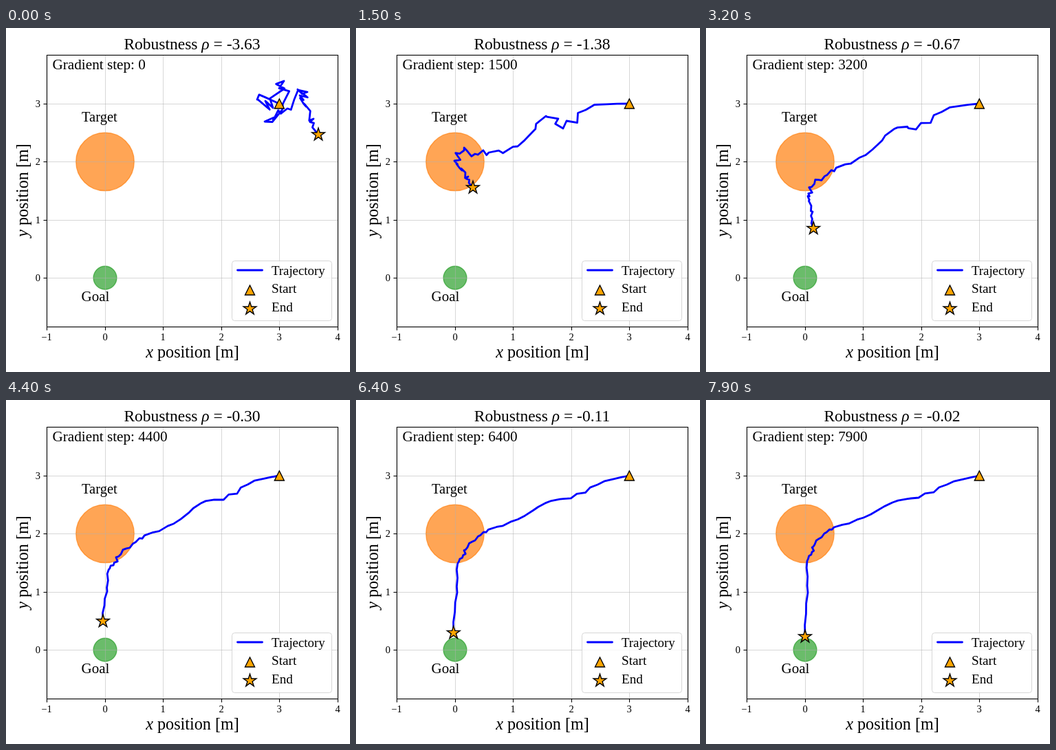
Animation of 500x500 px, one loop 8000 ms. Source, as an HTML page:

```html
<!DOCTYPE html>
<html lang="en">
<head>
<meta charset="utf-8">
<title>Trajectory optimisation</title>
<style>
html, body { margin: 0; width: 100%; height: 100%; overflow: hidden; background: #fff; }
svg { display: block; width: 100vw; height: 100vh; font-family: "Liberation Serif", serif; }
.marker { fill: #ffa500; stroke: #000; stroke-width: 1.4; }
.path { fill: none; stroke: #00f; stroke-width: 2.8; stroke-linejoin: round; stroke-linecap: round; }
.disc { fill-opacity: .7; stroke-opacity: .7; stroke-width: 1.4; }
.grid { stroke: #b0b0b0; stroke-opacity: .5; stroke-width: 1; }
.axis { fill: none; stroke: #000; stroke-width: 1.1; }
.tick { font-size: 14.5px; }
.label { font-size: 24.2px; text-anchor: middle; }
.legend { font-size: 19.2px; }
</style>
</head>
<body>
<svg viewBox="0 0 500 500">
  <circle class="disc" cx="144" cy="194.3" r="42.2" fill="#ff7f0e" stroke="#ff7f0e"/>
  <circle class="disc" cx="144" cy="363.1" r="16.9" fill="#2ca02c" stroke="#2ca02c"/>
  <g id="grid" class="grid"></g>
  <path id="trajectory" class="path"/>
  <path id="start" class="marker"/>
  <path id="end" class="marker"/>
  <g id="axes"><rect class="axis" x="59.5" y="39.5" width="423" height="395"/></g>

  <text x="270.5" y="31" text-anchor="middle" font-size="23.5">Robustness <tspan font-style="italic">ρ</tspan> = <tspan id="rho"></tspan></text>
  <text id="step" x="67.5" y="60" font-size="21.2"></text>
  <text x="110" y="136" font-size="20.5">Target</text>
  <text x="109.5" y="397" font-size="21">Goal</text>
  <text class="label" x="271" y="479"><tspan font-style="italic">x</tspan> position [m]</text>
  <text class="label" transform="translate(32 236) rotate(-90)"><tspan font-style="italic">y</tspan> position [m]</text>

  <g class="legend">
    <rect x="328.5" y="338.5" width="145" height="87" rx="4" fill="#fff" fill-opacity=".8" stroke="#ccc" stroke-opacity=".8"/>
    <path class="path" d="M336.5 352H372.5"/>
    <path id="legendStart" class="marker"/>
    <path id="legendEnd" class="marker"/>
    <text x="386" y="359" font-size="18.8">Trajectory</text>
    <text x="386" y="385">Start</text>
    <text x="386" y="412">End</text>
  </g>
</svg>
<script>
const $ = id => document.getElementById(id);
const LOOP = 8000, FRAME = 100, COUNT = 45, SPACING = 4;

// Key points of the random, the half-trained and the final path.
const walk = [[397,110], [365,104], [388,116], [404,77], [402,117], [376,136],
  [409,117], [438,93], [427,98], [436,114], [447,132], [454,155]];
const early = [[397,110], [334,119], [301,146], [276,128], [235,172], [193,181],
  [173,183], [157,178], [143,193], [154,207], [163,216], [170,232]];
const late = [[397,110], [350,123], [309,142], [271,149], [229,171], [186,185],
  [172,194], [158,210], [154,221], [147,234], [148,280], [144,344]];

// Shares of the first two paths; sag pulls the curve down, push moves it right.
const keys = [
  { t: 0,    rho: -3.63, walk: 1,   early: 0,   sag: 0,  push: 0 },
  { t: 900,  rho: -1.84, walk: .18, early: .82, sag: 0,  push: 0 },
  { t: 1500, rho: -1.38, walk: 0,   early: 1,   sag: 0,  push: 0 },
  { t: 2700, rho: -1.16, walk: 0,   early: .84, sag: 17, push: 0 },
  { t: 3200, rho: -.67,  walk: 0,   early: .47, sag: 33, push: 0 },
  { t: 4400, rho: -.3,   walk: 0,   early: .2,  sag: 21, push: 14 },
  { t: 5200, rho: -.2,   walk: 0,   early: .13, sag: 14, push: 12 },
  { t: 6400, rho: -.11,  walk: 0,   early: .05, sag: 6,  push: 6 },
  { t: 7900, rho: -.02,  walk: 0,   early: 0,   sag: 0,  push: 0 }
];

const lerp = (a, b, u) => a + (b - a) * u;
const toX = x => 59.4 + 84.44 * (x + 1);
const toY = y => 363.1 - 84.44 * y;
const snap = v => Math.round(v) + .5;
const move = (id, x, y) => $(id).setAttribute("transform", `translate(${x} ${y})`);

function seeded(seed) {
  return () => (seed = seed * 16807 % 2147483647) / 2147483647;
}

const random = seeded(2024);
const jitter = Array.from({ length: COUNT }, (_, i) =>
  [0, 1].map(() => (random() * 2 - 1) * (i % SPACING ? 1 : 0)));

function starPath(radius) {
  const corners = Array.from({ length: 10 }, (_, i) => {
    const r = i % 2 ? radius * .382 : radius, a = i * Math.PI / 5;
    return `${(r * Math.sin(a)).toFixed(2)} ${(-r * Math.cos(a)).toFixed(2)}`;
  });
  return `M${corners.join("L")}Z`;
}

function buildChart() {
  let grid = "", ticks = "";
  const line = (d, name = "") => `<path class="${name}" d="${d}"/>`;
  const label = (x, y, anchor, n) =>
    `<text class="tick" x="${x}" y="${y}" text-anchor="${anchor}">${String(n).replace("-", "−")}</text>`;
  for (let n = -1; n <= 4; n++) {
    const x = snap(toX(n));
    if (n > -1 && n < 4) grid += line(`M${x} 39V434`);
    ticks += line(`M${x} 434.5v5`, "axis") + label(x - .5, 454, "middle", n);
  }
  for (let n = 0; n <= 3; n++) {
    const y = snap(toY(n));
    grid += line(`M59 ${y}H482`);
    ticks += line(`M59.5 ${y}h-5`, "axis") + label(50, y + 4.5, "end", n);
  }
  $("grid").innerHTML = grid;
  $("axes").innerHTML += ticks;

  for (const id of ["start", "legendStart"]) $(id).setAttribute("d", "M0 -7L7 7H-7Z");
  for (const id of ["end", "legendEnd"]) $(id).setAttribute("d", starPath(9.8));
  move("start", 397.3, 110);
  move("legendStart", 354.5, 381);
  move("legendEnd", 354.5, 408);
}

function along(path, i, axis) {
  const k = Math.min(Math.floor(i / SPACING), path.length - 2);
  return lerp(path[k][axis], path[k + 1][axis], i / SPACING - k);
}

function poseAt(t) {
  const n = Math.max(1, keys.findIndex(key => key.t >= t));
  const from = keys[n - 1], to = keys[n], u = (t - from.t) / (to.t - from.t);
  const pose = {};
  for (const name in from) pose[name] = lerp(from[name], to[name], u);
  pose.late = 1 - pose.walk - pose.early;
  return pose;
}

function waypoint(pose, i) {
  const s = i / (COUNT - 1);
  const bend = [pose.push * Math.sin(1.2 * Math.PI * s), pose.sag * Math.sin(Math.PI * s * s)];
  const noise = 9 * pose.walk + 5.5 * pose.early + 1.8 * pose.late;
  return [0, 1].map(axis => (
    pose.walk * along(walk, i, axis) + pose.early * along(early, i, axis) +
    pose.late * along(late, i, axis) + bend[axis] + noise * jitter[i][axis]
  ).toFixed(2));
}

function draw(t) {
  const pose = poseAt(t);
  const points = Array.from({ length: COUNT }, (_, i) => waypoint(pose, i));
  $("trajectory").setAttribute("d", "M" + points.map(p => p.join(" ")).join("L"));
  move("end", ...points[COUNT - 1]);
  $("rho").textContent = pose.rho.toFixed(2);
  $("step").textContent = `Gradient step: ${t}`;
}

buildChart();
const begin = performance.now();
function tick() {
  const elapsed = (performance.now() - begin) % LOOP;
  draw(Math.floor(elapsed / FRAME) * FRAME);
  requestAnimationFrame(tick);
}
tick();
</script>
</body>
</html>
```
